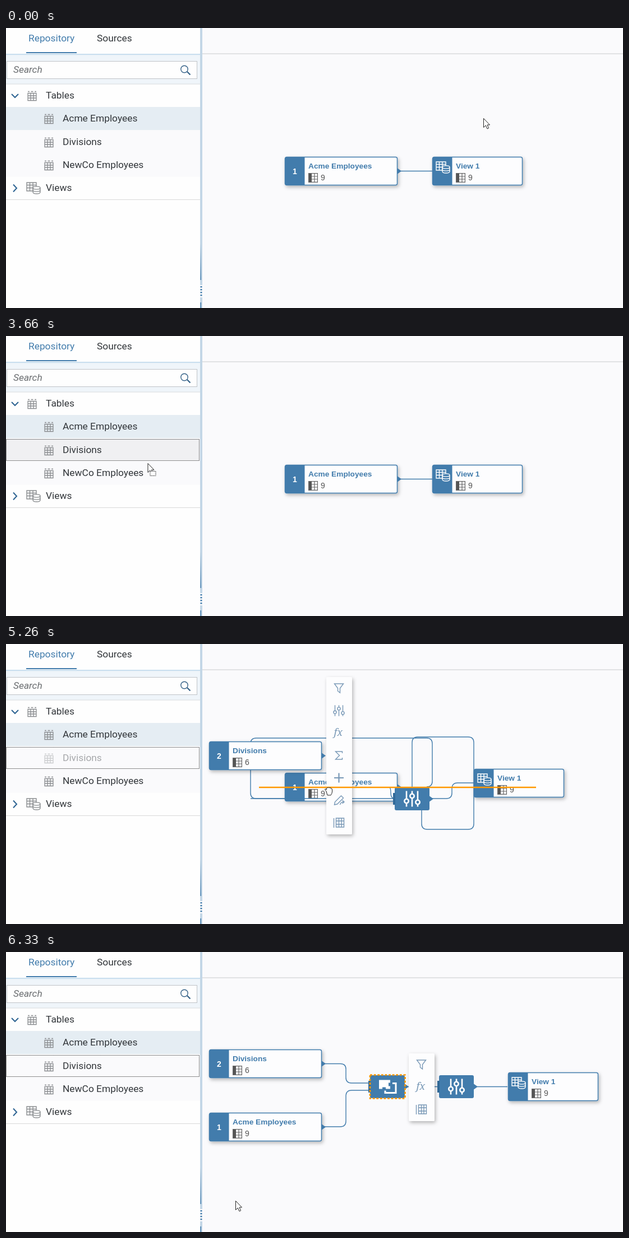
Animation of 1100 by 500 pixels, one loop 7.9 s. Source, as an HTML page:

```html
<!DOCTYPE html>
<html lang="en">
<head>
<meta charset="utf-8">
<title>Joining two tables</title>
<style>
html, body { margin: 0; width: 100%; height: 100%; overflow: hidden; background: #fafafc; }
svg { display: block; }
.ui { font: 17.35px Roboto, sans-serif; fill: #32363a; }
.title { font: bold 13.7px "Liberation Sans", Arial, sans-serif; fill: #427cac; }
.num { font: 14px "Liberation Sans", Arial, sans-serif; fill: #555; }
.badge { font: bold 14px "Liberation Sans", Arial, sans-serif; fill: #fff; text-anchor: middle; }
.line { fill: none; stroke: #427cac; stroke-width: 1.4; }
.tool { fill: none; stroke: #7898b6; stroke-width: 1.4; }
</style>
</head>
<body>
<svg id="stage" width="1100" height="500" viewBox="0 0 1100 500"></svg>
<script>
const LOOP = 7900;
const BLUE = '#427cac';
const clamp = v => Math.max(0, Math.min(1, v));
const ramp = (t, a, b) => clamp((t - a) / (b - a));
const mix = (a, b, k) => a + (b - a) * k;
const at = (x, y, body, extra = '') => `<g transform="translate(${x} ${y})" ${extra}>${body}</g>`;
const rect = (x, y, w, h, fill, extra = '') =>
  `<rect x="${x}" y="${y}" width="${w}" height="${h}" fill="${fill}" ${extra}/>`;
const text = (x, y, cls, s, extra = '') => `<text x="${x}" y="${y}" class="${cls}" ${extra}>${s}</text>`;
const path = (d, extra = '') => `<path d="${d}" ${extra}/>`;
const group = (id, body = '', extra = '') => `<g id="${id}" ${extra}>${body}</g>`;

// Icons
const tableIcon = path('M1 4.5H16V17.5H1ZM1 9H16M1 13H16M6 4.5V17.5M11 4.5V17.5M1 1.5H4M6.5 1.5H10.5M13 1.5H16',
  'fill="none" stroke="#8a8d90" stroke-width="1.3"');
const viewIcon = (color, back) =>
  path('M1 1H18V16H1ZM1 5.5H18M1 10.5H18M6.5 1V16M12 1V16', `fill="none" stroke="${color}" stroke-width="1.4"`) +
  path('M12 10.5V18C12 22 25 22 25 18V10.5C25 7 12 7 12 10.5C12 14 25 14 25 10.5M12 14.5C12 18 25 18 25 14.5',
    `fill="${back}" stroke="${color}" stroke-width="1.4"`);
const columnIcon = rect(0, 0, 6, 17, '#555') +
  path('M.6 .6H16.4V16.4H.6ZM6 6H16.4M6 11H16.4M11 .6V16.4', 'fill="none" stroke="#666" stroke-width="1.2"');
const sliders = color => [[-10, 4], [0, -5], [10, 6]].map(([x, y]) =>
  path(`M${x} -14V${y - 4}M${x} ${y + 4}V14`) + `<circle cx="${x}" cy="${y}" r="3.7"/>`).join('');
const toolIcons = {
  filter: path('M-8 -8H8L2 0V8L-2 5V0Z'),
  slide: at(0, 0, `<g transform="scale(.7)" stroke-width="2">${sliders()}</g>`),
  fx: text(-9, 5, '', 'fx', 'style="font:italic 18px \'Noto Serif\',serif;fill:#7898b6;stroke:none"'),
  sum: path('M6 -4V-7H-6L1 0L-6 7H6V4'),
  plus: path('M-8.500 0H8.500M0 -8.500V8.500', 'stroke-width="2.2"'),
  edit: path('M-8 8L-7 3L4 -8L8 -4L-3 7ZM2 8Q3 3 9 3M6 0L9.500 3L6 6'),
  grid: path('M-5 -8H9V8H-5ZM-5 -3H9M-5 3H9M0 -8V8M4.500 -8V8M-9 -8V9', 'stroke-dasharray="none"')
};
const toolbar = (id, x, y, names) => group(id,
  rect(x, y, 46, names.length * 40 + 1, '#fdfdfe', 'rx="2" filter="url(#shadow)"') +
  names.map((n, i) => at(x + 22.5, y + 20 + i * 40, toolIcons[n], 'class="tool"')).join(''));

// Diagram parts
const arrow = (x, y) => path(`M${x} ${y - 5}L${x + 7} ${y}L${x} ${y + 5}Z`, `fill="${BLUE}"`);
const card = (id, w, head, name, count, out) => group(id,
  rect(.5, .5, w - 1, 50, '#fdfdfe', `rx="3" stroke="${BLUE}" stroke-width="1.5" filter="url(#shadow)"`) +
  path('M35.500 .5H3Q.5 .5 .5 3V48Q.5 50.500 3 50.500H35.500Z', `fill="${BLUE}"`) + head +
  text(42, 20.5, 'title', name) + at(42, 29, columnIcon) + text(64, 42, 'num', count) +
  (out ? arrow(w, 25.5) : ''));
const badge = n => text(18, 31, 'badge', n);
const step = (id, icon) => group(id,
  rect(0, 0, 62, 41, BLUE, 'rx="3"') + rect(-3, 10, 4, 21, '#326a99') + arrow(62, 20.5) + at(31, 20.5, icon));
const joinIcon = rect(-15, -12, 20, 16, '#fff') +
  path('M-6 -4H16V12H-6Z', `fill="none" stroke="${BLUE}" stroke-width="6"`) +
  path('M9 -6H15V11H-4V7', 'fill="none" stroke="#fff" stroke-width="3"') +
  rect(-12, -9, 14, 10, '#fff');
const slideIcon = `<g fill="none" stroke="#fff" stroke-width="2.6">${sliders()}</g>`;

const row = (x, y, icon, name, id) => group(id, at(x, y - 8, icon) + text(x + 33, y + 6, 'ui', name));
const sidebar =
  rect(0, 0, 346, 500, '#fefefe') +
  text(40, 24, 'ui', 'Repository', `style="fill:${BLUE}"`) + text(162, 24, 'ui', 'Sources') +
  rect(36, 43, 90, 2, BLUE) + rect(0, 46, 347, 2.500, '#c9dfef') + rect(0, 48.5, 346, 51, '#eff5fa') +
  rect(1.5, 59.5, 339, 31, '#fefefe', 'stroke="#bfc3c7"') +
  text(13, 80, 'ui', 'Search', 'style="font-style:italic;fill:#6a6d70"') +
  path('M323 78L328.500 83.500', 'stroke="#346187" stroke-width="2.2"') +
  '<circle cx="318" cy="73.500" r="6.200" fill="none" stroke="#346187" stroke-width="1.4"/>' +
  rect(0, 99.5, 346, 1, '#d5d9dd') + rect(0, 141, 346, 41.5, '#e5edf3') + rect(0, 182.5, 346, 83, '#fafafc') +
  group('focus', rect(0, 184, 345, 38, '#f0f0f2', 'id="rowFill"') +
    path('M.5 184.500H344.500V222.500H.5Z', 'fill="none" stroke="#222" stroke-dasharray="1 1"')) +
  path('M10 118L16 124L22 118M13 279.500L19 286L13 292.500', 'fill="none" stroke="#2f6593" stroke-width="2"') +
  row(38, 120, tableIcon, 'Tables', 'tables') + row(68, 161, tableIcon, 'Acme Employees', 'row1') +
  row(68, 203, tableIcon, 'Divisions', 'row2') + row(68, 244, tableIcon, 'NewCo Employees', 'row3') +
  at(36, 275, viewIcon('#8a8d90', '#fefefe')) + text(71, 291, 'ui', 'Views') +
  rect(0, 306, 346, 1, '#d9d9d9') +
  rect(346, 0, 4, 500, '#c3d6e6') + rect(346.5, 385, 1.5, 65, 'url(#fade)') + rect(346.5, 490, 1.5, 10, BLUE) +
  rect(346, 459, 4, 22, '#fafafc') +
  [462, 467, 472, 477].map(y => rect(346.5, y - 1, 3, 2.5, BLUE)).join('');

const popup = group('popup',
  rect(700, 219, 122, 81, '#fefefe', 'rx="3" filter="url(#shadow)"') +
  rect(701, 268, 119, 29, '#fefefe', `rx="2" stroke="${BLUE}"`) +
  '<g fill="none" stroke="#555" stroke-width="1.4"><circle cx="716" cy="230" r="6.500"/><circle cx="725" cy="230" r="6.500"/></g>' +
  rect(711, 269, 12, 9, '#555') + path('M717 273H730V283H717Z', 'fill="none" stroke="#555" stroke-width="2"') +
  text(744, 235.5, 'ui', 'Union', 'style="font-size:15px"') + text(744, 281, 'ui', 'Join', 'style="font-size:15px"'));

const cursor = group('cursor',
  group('arrow', path('M.5 .5V16.500L4.300 13L7 19L9.600 17.800L7 12H11.500Z', 'fill="#fff" stroke="#222"')) +
  group('dragBox', path('M4.500 14.500H14.500V22.500H4.500Z', 'fill="#fff" stroke="#222" stroke-dasharray="1.500 1"')) +
  group('hand', path('M3 8L1 5.500Q0 3.500 2 4L3.500 5V2.500Q4.500 .5 6 2Q7.500 0 9 2Q11 1 11.500 3Q13.500 3 13.500 5V9Q13 13 11 15H5Z',
    'fill="#fff" stroke="#222"')));

const stage = document.getElementById('stage');
stage.innerHTML = `<defs>
  <filter id="shadow" x="-30%" y="-30%" width="160%" height="170%">
    <feDropShadow dx="2" dy="3" stdDeviation="3" flood-color="#000" flood-opacity=".28"/></filter>
  <linearGradient id="fade" x2="0" y2="1"><stop stop-color="#c3d6e6"/><stop offset="1" stop-color="${BLUE}"/></linearGradient>
  </defs>` +
  rect(0, 0, 1100, 500, '#fafafc') + rect(350, 45.5, 750, 1, '#c9cbce') +
  path('', 'id="backEdges" class="line"') +
  card('acme', 201, badge(1), 'Acme Employees', 9, true) +
  card('divisions', 201, badge(2), 'Divisions', 6, true) +
  path('', 'id="edges" class="line"') +
  step('join', joinIcon) + step('projection', slideIcon) +
  card('view', 161, at(6, 8, viewIcon('#fff', BLUE)), 'View 1', 9) +
  rect(649, 219.5, 62.5, 42, 'none', 'id="target" stroke="#ff9800" stroke-width="2.6" stroke-dasharray="4 2.600"') +
  toolbar('longBar', 571, 59, ['filter', 'slide', 'fx', 'sum', 'plus', 'edit', 'grid']) +
  toolbar('shortBar', 718, 181, ['filter', 'fx', 'grid']) +
  popup + path('', 'id="beam" stroke="#ff9800"') + sidebar + cursor;

const el = {};
stage.querySelectorAll('[id]').forEach(n => el[n.id] = n);
const set = (id, name, v) => el[id].setAttribute(name, v);
const show = (id, on) => set(id, 'display', on ? 'inline' : 'none');
const move = (id, x, y) => set(id, 'transform', `translate(${x} ${y})`);

// Time, x, y
const track = [
  [1630, 851, 161], [2360, 365, 191], [2400, 320, 195], [2800, 79, 192], [3270, 79, 192],
  [3660, 252, 227], [4300, 554, 261], [4860, 574, 262], [4960, 568, 255],
  [5360, 568, 255], [5660, 526, 284], [5960, 470, 358], [6330, 409, 444]
];
function follow(t) {
  const i = track.findIndex(p => p[0] > t);
  if (i === 0) return track[0].slice(1);
  if (i < 0) return track[track.length - 1].slice(1);
  const [a, b] = [track[i - 1], track[i]];
  const k = ramp(t, a[0], b[0]);
  return [mix(a[1], b[1], k), mix(a[2], b[2], k)];
}

const DROP = 5200, LAYOUT = 5350, DONE = 5960;
const looped = 'M693 276H446Q436 276 436 266V178Q436 168 446 168H750Q760 168 760 178V245Q760 255 750 255' +
  'M724 256V176Q724 166 734 166H824Q834 166 834 176V321Q834 331 824 331H751Q741 331 741 321V296' +
  'M755 276H785Q795 276 795 266V258Q795 248 805 248H834';
const settled = 'M563 199.500H596Q606 199.500 606 209V224Q606 234 616 234H649' +
  'M563 312H596Q606 312 606 302V257Q606 247 616 247H649M711 240.500H772M833 240.500H894';

function draw(t) {
  const dropped = t >= DROP, sorting = t >= LAYOUT, done = t >= DONE;
  const k = ramp(t, LAYOUT, DONE);
  const ax = mix(497, 362, k), ay = mix(230, 287, k);
  const jx = mix(693, 649, k), jy = mix(256, 220, k);
  const px = mix(693, 772, k), py = jy;
  const vx = dropped ? mix(834, 895, k) : 760, vy = dropped ? mix(223, 215, k) : 230;

  move('acme', ax, ay);
  move('divisions', 362, 174);
  move('join', jx, jy);
  move('projection', px, py);
  move('view', vx, vy);
  show('divisions', dropped);
  show('projection', dropped);
  show('join', sorting);
  show('target', sorting);
  show('longBar', dropped && !sorting);
  show('shortBar', sorting);

  let front = '';
  if (done) front = settled;
  else if (sorting) {
    const c = jx + 22, y = jy + 20;
    front = `M563 203H${c - 10}Q${c} 203 ${c} 213V${jy}` +
      `M${jx - 43} ${y - 26}H${jx - 29}Q${jx - 19} ${y - 26} ${jx - 19} ${y - 16}V${y - 10}Q${jx - 19} ${y} ${jx - 9} ${y}H${jx}` +
      `M${ax + 211} ${ay + 21}H${c - 13}Q${c} ${ay + 21} ${c} ${ay + 14}` +
      `M${px + 62} ${py + 22}H${vx - 37}`;
  } else if (dropped) front = 'M436 276H693M684 256Q686 258 686 266Q686 276 693 276';
  set('edges', 'd', front);
  set('backEdges', 'd', !dropped ? 'M698 255.500H760' : sorting ? '' : looped);

  show('beam', t >= 4100 && !sorting);
  set('beam', 'd', `M${mix(350, 451, ramp(t, 4320, 4900))} 256H945`);
  set('beam', 'stroke-width', mix(1.6, 2.6, ramp(t, 4300, 4800)));
  set('beam', 'opacity', t < 4300 ? .65 * ramp(t, 4090, 4300) : mix(.65, 1, ramp(t, 4300, 4700)));
  show('popup', t > 4270 && t < 5130);
  set('popup', 'opacity', ramp(t, 4285, 4535));

  const grey = t >= 3700 && t < LAYOUT;
  show('focus', t >= 3130);
  set('rowFill', 'fill', t < 3700 ? '#f0f0f2' : '#fafafc');
  set('row2', 'opacity', grey ? .42 : 1);

  const hand = t >= 5130 && t < 5360;
  move('cursor', ...follow(t));
  show('hand', hand);
  show('arrow', !hand);
  show('dragBox', t >= 3400 && t < 5130);
}

const start = performance.now();
function tick() {
  draw((performance.now() - start) % LOOP);
  requestAnimationFrame(tick);
}
draw(0);
requestAnimationFrame(tick);
</script>
</body>
</html>
```
